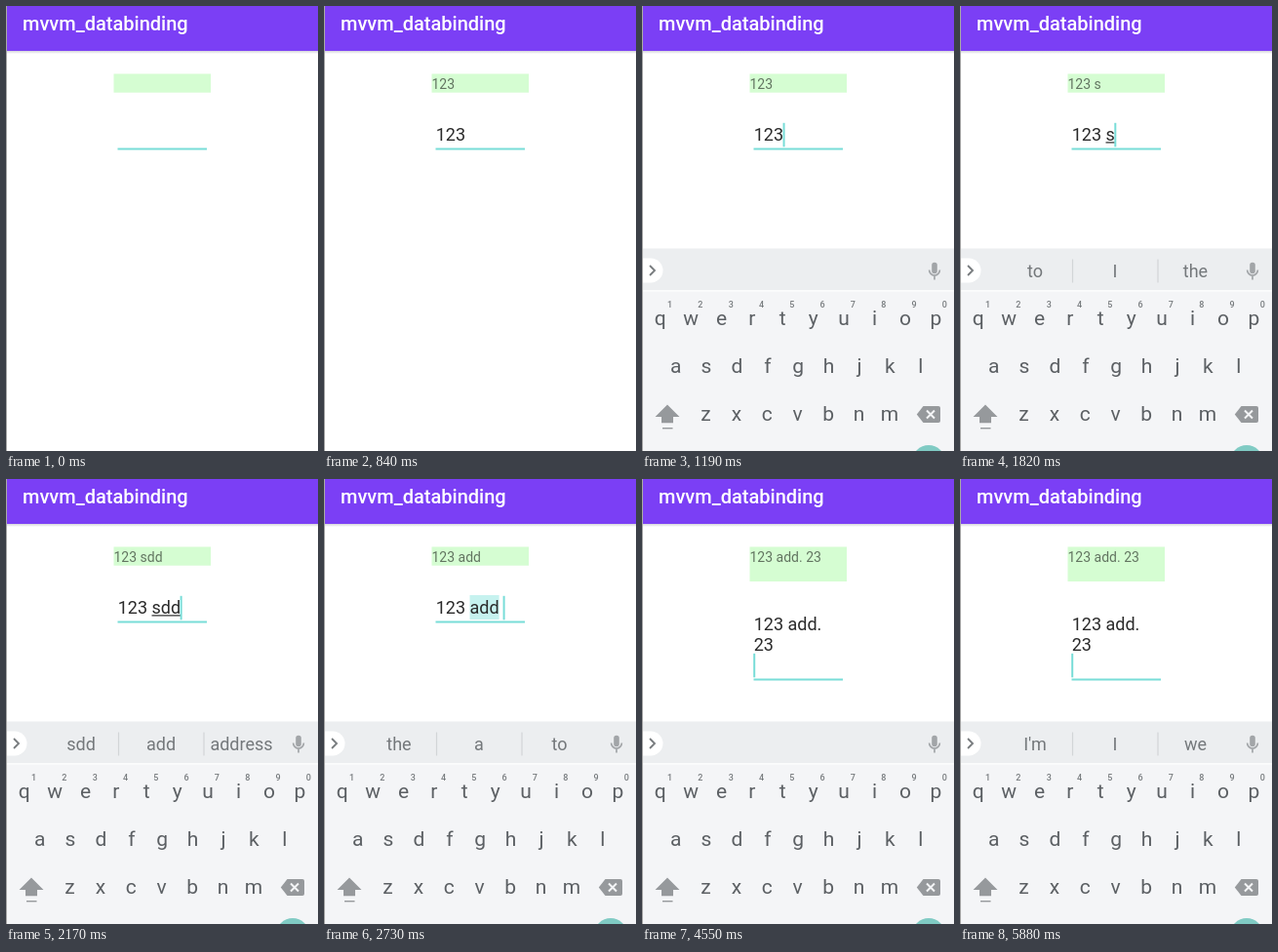
Recreate the animation shown at these times as an HTML page. Size 320 by 456 pixels, loop 6.02 s.

```html
<!DOCTYPE html>
<html lang="en">
<head>
<meta charset="utf-8">
<title>Two-way data binding</title>
<style>
  html, body { margin: 0; width: 100%; height: 100%; overflow: hidden; background: #fff; }
  svg { display: block; width: 320px; height: 456px; font-family: Roboto, sans-serif; }
  text { white-space: pre; }
  .mid { text-anchor: middle; }
  .field { font-size: 18px; fill: #2b2b2b; }
  .key { font-size: 21px; fill: #5c6064; }
  .hint { font-size: 9px; font-weight: 500; fill: #777b7e; }
  .word { font-size: 18px; fill: #74787b; }
</style>
</head>
<body>
<svg viewBox="0 0 320 456">
  <defs>
    <linearGradient id="shade" x2="0" y2="1">
      <stop stop-color="#d4d4da"/>
      <stop offset="1" stop-color="#fff"/>
    </linearGradient>
  </defs>
  <rect width="320" height="456" fill="#fff"/>
  <rect y="46" width="320" height="3" fill="url(#shade)"/>
  <rect width="320" height="46" fill="#7b3ff5"/>
  <text x="17" y="25" font-size="20" font-weight="500" fill="#fff">mvvm_databinding</text>

  <rect id="labelBox" x="110.5" y="69.5" width="99.5" fill="#d5fdd2"/>
  <text id="label" x="110.5" y="85" font-size="14" fill="#000" fill-opacity=".54"></text>

  <g id="edit">
    <rect id="flash" y="119" height="25" fill="#c6f2ef"/>
    <text id="line0" class="field" x="114.7"></text>
    <text id="line1" class="field" x="114.7"></text>
    <rect id="composing" y="139.3" height="1.2" fill="#2b2b2b"/>
    <rect id="underline" x="114.5" width="91.5" height="2" fill="#79ddd8"/>
    <rect id="cursor" width="2" height="24.5" fill="#79ddd8"/>
  </g>

  <g id="keyboard">
    <rect y="248.5" width="320" height="43" fill="#eceef0"/>
    <rect y="291.5" width="320" height="220" fill="#f4f5f7"/>
    <rect y="291.3" width="320" height="1.2" fill="#fff"/>
    <path d="M0 258.5H9a12.5 12.5 0 0 1 0 25H0z" fill="#fff"/>
    <path d="M8 266l5 5-5 5" fill="none" stroke="#777b7e" stroke-width="1.8"/>
    <g id="mic" fill="none" stroke="#a2a5a8" stroke-width="1.7">
      <rect x="297.2" y="262.8" width="5.6" height="11.5" rx="2.8" fill="#a2a5a8" stroke="none"/>
      <path d="M294.6 270.5a5.4 5.6 0 0 0 10.8 0M300 276v4.6"/>
    </g>
    <g id="words">
      <path d="M115.5 259.5v24M203 259.5v24" stroke="#d2d5d7" stroke-width="1.2"/>
    </g>
    <g id="keys"></g>
    <path d="M26 408.5L38.5 421H32v6.3H20V421h-6.5z" fill="#96999c"/>
    <path d="M21 432.7h10.5" stroke="#96999c" stroke-width="1.4"/>
    <path d="M288.5 410H304a2 2 0 0 1 2 2v13a2 2 0 0 1-2 2H288.5l-6.7-8.5z" fill="#96999c"/>
    <path d="M292 414.5l8 8m0-8l-8 8" stroke="#f4f5f7" stroke-width="2"/>
    <circle cx="294" cy="467" r="17" fill="#80cbc4"/>
  </g>
  <rect width="1" height="456" fill="#aaa"/>
</svg>
<script>
const LOOP = 6020, TICK = 70, LINE = 21.1, LEFT = 114.7, WRAP = 91;

// Each track lists [start, value]; a value holds until the next start.
const typed = [
  [0, ''], [70, '1'], [210, '12'], [350, '123'], [1540, '123 '],
  [1820, '123 s'], [1890, '123 sd'], [2170, '123 sdd'], [2730, '123 add '],
  [3220, '123 add. '], [3500, '123 add. 2'], [3640, '123 add. 23'], [4550, '123 add. 23\n']
];
const suggested = [
  [0, ''], [1610, 'to I the'], [2030, 'SD sd and'], [2170, 'sdd add address'],
  [2730, 'the a to'], [3290, "I'm I we"], [3500, ''], [4830, "I'm I we"]
];
const blink = [
  [0, false], [70, true], [840, false], [980, true],
  [4200, false], [4550, true], [5110, false], [5670, true]
];

const $ = id => document.getElementById(id);
const set = (el, attrs) => { for (const k in attrs) el.setAttribute(k, attrs[k]); };
const show = (el, on) => set(el, { visibility: on ? 'visible' : 'hidden' });
const at = (track, t) => track.findLast(([start]) => start <= t)[1];
const clamp = v => Math.max(0, Math.min(1, v));

function addText(parent, cls, x, y, content = '') {
  const el = document.createElementNS('http://www.w3.org/2000/svg', 'text');
  set(el, { class: cls + ' mid', x, y });
  el.textContent = content;
  parent.append(el);
  return el;
}

const rows = [['qwertyuiop', 18.7, 326.5], ['asdfghjkl', 34.6, 376], ['zxcvbnm', 65.5, 425]];
for (const [letters, x, y] of rows)
  [...letters].forEach((c, i) => addText($('keys'), 'key', x + i * 31.4, y, c));
[...'1234567890'].forEach((c, i) => addText($('keys'), 'hint', 28.6 + i * 31.3, 308.5, c));
const slots = [77, 159, 241.5].map(x => addText($('words'), 'word', x, 277.7));

const pen = document.createElement('canvas').getContext('2d');
pen.font = '18px Roboto, sans-serif';
const width = s => pen.measureText(s).width;

function wrap(text) {
  return text.split('\n').flatMap(line => {
    if (width(line) <= WRAP) return [line];
    const cut = line.lastIndexOf(' ');
    return [line.slice(0, cut), line.slice(cut + 1)];
  });
}

function span(el, text, start, end) {
  set(el, { x: LEFT + width(text.slice(0, start)), width: width(text.slice(start, end)) });
}

function drawField(t) {
  const text = at(typed, t);
  const lines = wrap(text);
  const last = lines.length - 1;
  const tall = text.includes('\n');

  $('label').textContent = text.trimEnd();
  set($('labelBox'), { height: tall ? 35.5 : 19.2 });
  set($('edit'), { transform: `translate(0 ${tall ? 16.8 : 0})` });
  [0, 1].forEach(i => {
    $('line' + i).textContent = lines[i] || '';
    set($('line' + i), { y: 138.4 + i * LINE });
  });
  set($('underline'), { y: 145.5 + last * LINE });
  set($('cursor'), { x: LEFT - 0.5 + width(lines[last]), y: 119.8 + last * LINE });
  show($('cursor'), at(blink, t));

  span($('composing'), text, 4, text.length);
  show($('composing'), t >= 1820 && t < 2730);
  span($('flash'), text, 4, 7);
  show($('flash'), t >= 2730 && t < 3080);
}

function drawKeyboard(t) {
  const since = t - 970;
  const slide = 52 * (1 - clamp(since / 210)) ** 2;
  set($('keyboard'), { transform: `translate(0 ${slide})`, opacity: clamp(since / 150) });

  const words = at(suggested, t);
  show($('words'), words !== '');
  words.split(' ').forEach((word, i) => { slots[i].textContent = word; });
}

function frame(now) {
  const t = Math.floor((now % LOOP) / TICK) * TICK;
  drawField(t);
  drawKeyboard(t);
  requestAnimationFrame(frame);
}

let origin;
requestAnimationFrame(function start(now) {
  origin = now;
  const run = time => { frameAt(time - origin); requestAnimationFrame(run); };
  run(now);
});

function frameAt(elapsed) {
  const t = Math.floor((Math.max(0, elapsed) % LOOP) / TICK) * TICK;
  drawField(t);
  drawKeyboard(t);
}
</script>
</body>
</html>
```
